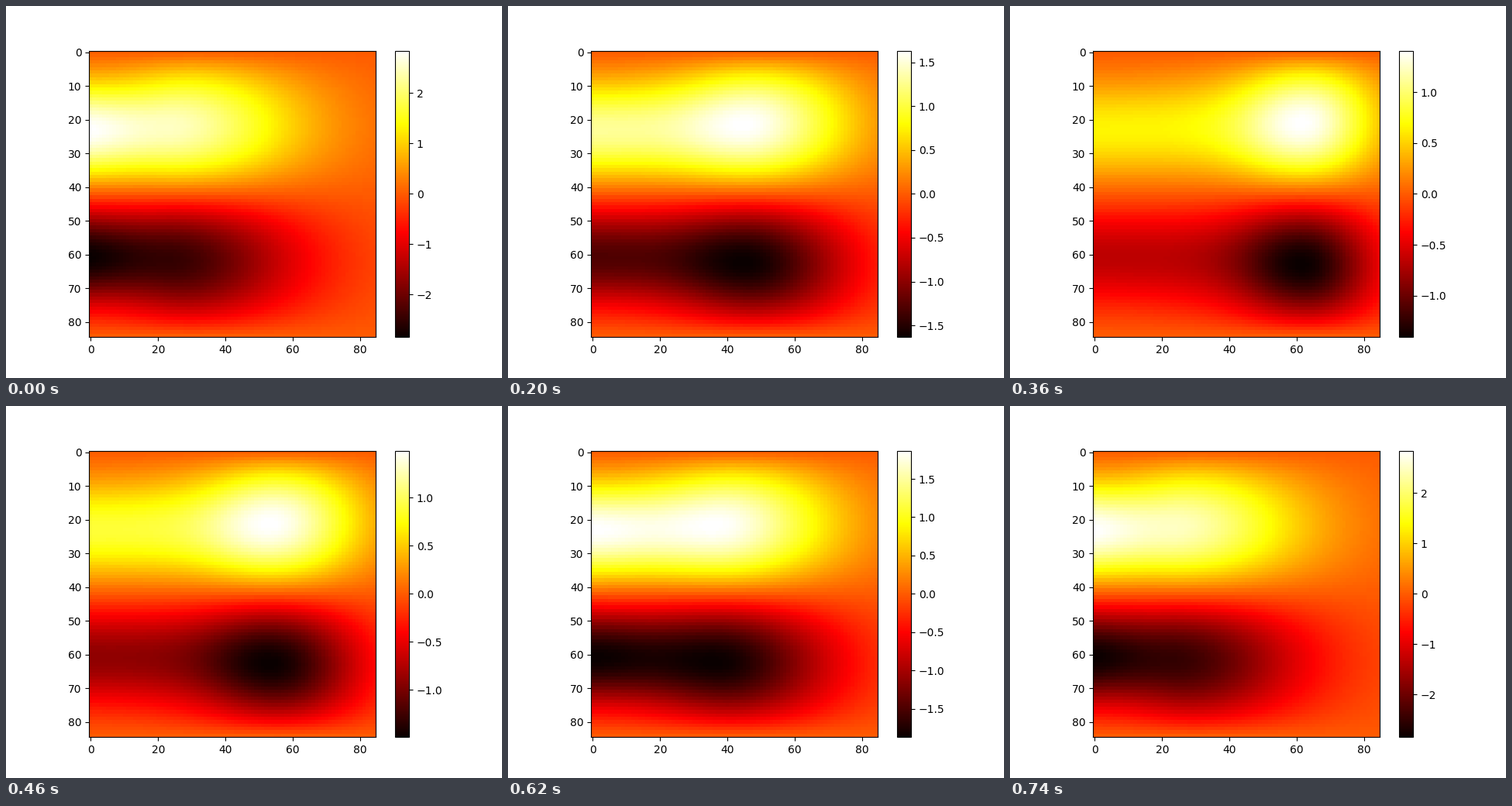
These frames come from a looping animation (640 px wide and 480 px high, 760 ms). A matplotlib script:

```python
import numpy as np
import matplotlib.pyplot as plt
from matplotlib.animation import FuncAnimation

N = 85
STEPS = 19          # states on the way out; the way back mirrors them
INTERVAL = 20

x = np.arange(N, dtype=float)
u = 2 * np.pi * np.arange(N)[:, None] / (N - 1)

KEYS = [0, 6, 14, 18]


def curve(values):
    """Cubic in time through four key values."""
    return np.poly1d(np.polyfit(KEYS, values, 3))


center = curve([22, 36, 53, 61.5])
spread = curve([28, 24.8, 18.9, 15.3])
edge_log = curve(np.log([2.843, 1.868, 0.895, 0.652]))
blob_log = curve(np.log([2.5, 1.867, 1.49, 1.407]))


def bell(d, width):
    return np.exp(-0.5 * (d / width) ** 2)


def along(k, edge, blob):
    """Strength along x: a plateau from the left edge, then the moving blob."""
    mu = center(k)
    w0 = bell(mu, 13.5)
    w = (bell(x - mu, 13.5) - w0) / (1 - w0)
    dip = 0.045 * np.exp(-((k - 7) / 5) ** 2) * np.sin(np.pi * x / mu) ** 2
    left = edge * (1 - w - dip) + blob * w
    right = blob * bell(x - mu, spread(k))
    return np.where(x < mu, left, right)


def across(k):
    """Antisymmetric profile over y, more skewed near the left edge."""
    near = np.exp(-(x / (0.7 * center(k) + 5)) ** 2)
    skew = 0.14 * near + (0.03 - k / 300) * (1 - near)
    shape = np.sin(u) - skew * np.sin(2 * u) - 0.08 * near * np.sin(3 * u)
    return shape / np.abs(shape).max(axis=0)


def field(k):
    edge, blob = np.exp(edge_log(k)), np.exp(blob_log(k))
    return across(k) * along(k, edge, blob), max(edge, blob)


fig, ax = plt.subplots(figsize=(6.4, 4.8), dpi=100)
data, top = field(0)
im = ax.imshow(data, cmap="hot", vmin=-top, vmax=top)
fig.colorbar(im, ax=ax)


def update(frame):
    k = min(frame, 2 * STEPS - 1 - frame)
    data, top = field(k)
    im.set_data(data)
    im.set_clim(-top, top)
    return [im]


anim = FuncAnimation(fig, update, frames=2 * STEPS, interval=INTERVAL,
                     repeat=True, repeat_delay=0, blit=False)
plt.show()
```
